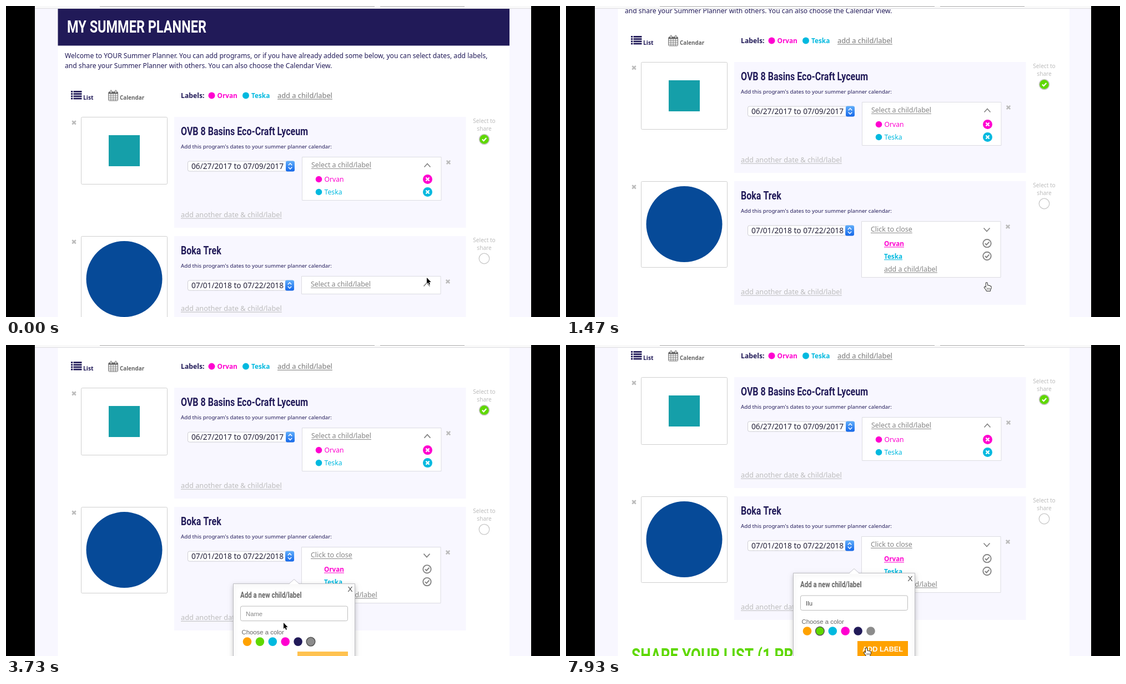
Recreate the animation shown at these times as an HTML page with a canvas. Size 998 by 561 pixels, loop 8000 ms.

```html
<!DOCTYPE html>
<html lang="en">
<head>
<meta charset="utf-8">
<title>Summer planner</title>
<style>
html, body { margin: 0; width: 100%; height: 100%; overflow: hidden; background: #000; }
canvas { display: block; }
</style>
</head>
<body>
<canvas id="stage" width="998" height="561"></canvas>
<script>
const ctx = document.getElementById('stage').getContext('2d');
const LOOP = 8000;
const NAVY = '#211a58', PINK = '#ff00d0', CYAN = '#00b9df', GREEN = '#5fd800', ORANGE = '#ffa200';
const LAVENDER = '#f8f7ff', GRAY = '#858585', PALE = '#bcbcbc';
const SANS = '"Noto Sans", sans-serif', FORM = '"Liberation Sans", Arial, sans-serif';
const CONDENSED = 0.77;
const KIDS = [['Orvan', PINK], ['Teska', CYAN]];
const NEW_KID = 'Ilu';
const OPEN_AT = 530, FOCUS_AT = 5160, TYPE_AT = 5520, PICK_AT = 6980;

const SCROLL = [[0, 0], [803, 0], [870, 13], [930, 28.5], [1130, 72], [1300, 92], [1470, 99],
  [2403, 99], [2670, 102], [3535, 102], [3650, 111], [3800, 133], [3930, 142]];
const CURSOR_X = [[0, 758], [930, 757.5], [1470, 758], [1670, 704], [1900, 655], [2070, 636], [2935, 636],
  [3270, 500], [4005, 500], [4870, 477], [6265, 477], [6800, 456], [7535, 456], [7930, 541]];
const CURSOR_Y = [[0, 490], [70, 490], [130, 498.5], [930, 498.5], [1470, 499.5], [1670, 499], [2070, 474.5], [2935, 474.5],
  [3270, 501], [4005, 501], [4870, 465.5], [6265, 465.5], [6800, 511], [7535, 511], [7930, 547]];

const clamp = v => Math.max(0, Math.min(1, v));
const ramp = (t, start, length) => clamp((t - start) / length);

function track(keys, t) {
  const i = keys.findIndex(k => k[0] > t);
  if (i < 0) return keys[keys.length - 1][1];
  const [t0, a] = keys[i - 1], [t1, b] = keys[i];
  return a + (b - a) * (t - t0) / (t1 - t0);
}

function rect(x, y, w, h, fill, stroke, radius = 0) {
  ctx.beginPath();
  ctx.roundRect(x, y, w, h, radius);
  if (fill) { ctx.fillStyle = fill; ctx.fill(); }
  if (stroke) { ctx.strokeStyle = stroke; ctx.lineWidth = 1; ctx.stroke(); }
}

function disc(x, y, r, fill, stroke, width = 1.5) {
  ctx.beginPath();
  ctx.arc(x, y, r, 0, Math.PI * 2);
  if (fill) { ctx.fillStyle = fill; ctx.fill(); }
  if (stroke) { ctx.strokeStyle = stroke; ctx.lineWidth = width; ctx.stroke(); }
}

function line(points, color, width) {
  ctx.beginPath();
  points.forEach(([x, y]) => ctx.lineTo(x, y));
  ctx.strokeStyle = color;
  ctx.lineWidth = width;
  ctx.stroke();
}

function text(str, x, y, size, color, { weight = 400, family = SANS, align = 'left', underline = false } = {}) {
  ctx.font = `${weight} ${size}px ${family}`;
  ctx.textAlign = align;
  ctx.fillStyle = color;
  ctx.fillText(str, x, y);
  if (underline) ctx.fillRect(x, y + 1.6, ctx.measureText(str).width, 1);
}

function heading(str, x, y, size, color) {
  ctx.save();
  ctx.translate(x, y);
  ctx.scale(CONDENSED, 1);
  text(str, 0, 0, size, color, { weight: 700, family: 'Roboto, sans-serif' });
  ctx.restore();
}

function cross(x, y, r, color, width) {
  line([[x - r, y - r], [x + r, y + r]], color, width);
  line([[x + r, y - r], [x - r, y + r]], color, width);
}

const check = (x, y, color, width = 2) => line([[x - 3.6, y], [x - 1, y + 2.7], [x + 3.8, y - 2.6]], color, width);
const chevron = (x, y, w, h, color, width) => line([[x - w, y + h], [x, y - h], [x + w, y + h]], color, width);

function toolbar() {
  rect(52, 0, 894, 5, '#f9f9f9');
  rect(52, 4, 894, 1, '#dcdce0');
  rect(169, 0, 495, 1, '#aaa');
  rect(674, 0, 152, 1, '#aaa');
}

function pageTop() {
  rect(93.5, 0, 813.5, 71.5, NAVY);
  heading('MY SUMMER PLANNER', 110, 47.5, 30.5, '#fff');
  text('Welcome to YOUR Summer Planner. You can add programs, or if you have already added some below, you can select dates, add labels,', 106, 93.5, 12.11, NAVY);
  text('and share your Summer Planner with others. You can also choose the Calendar View.', 106, 111.5, 12.11, NAVY);

  for (let i = 0; i < 4; i++) {
    rect(117, 153 + i * 4.2, 3.2, 2.8, NAVY);
    rect(121.5, 153 + i * 4.2, 15, 2.8, NAVY);
  }
  text('List', 139, 168.5, 10.3, NAVY, { weight: 700 });

  rect(184.7, 155, 16.8, 15.8, '#fff', '#666', 1.5);
  rect(185, 155, 16.5, 3.5, '#666');
  for (let i = 1; i < 4; i++) {
    line([[184.7 + i * 4.2, 158], [184.7 + i * 4.2, 171]], '#777', 0.9);
    line([[185, 158 + i * 3.3], [201.5, 158 + i * 3.3]], '#777', 0.9);
  }
  for (const x of [188, 196.5]) rect(x, 152, 2.5, 5, '#fff', '#666', 1);
  text('Calendar', 205, 168.5, 9.9, '#666', { weight: 600 });

  text('Labels:', 315, 166, 12.2, NAVY, { weight: 600 });
  KIDS.forEach(([name, color], i) => {
    disc(370.5 + i * 61.5, 161.5, 6, color);
    text(name, 380.5 + i * 61.5, 166, 11.8, color, { weight: 600 });
  });
  text('add a child/label', 489, 166, 12.8, '#777', { weight: 500, underline: true });
}

function dateSelect(y, dates, right) {
  rect(327.5, y + 80, right - 328, 18, '#fff', '#cfcfd4', 3);
  const blue = ctx.createLinearGradient(0, y + 79, 0, y + 98);
  blue.addColorStop(0, '#63b0fb');
  blue.addColorStop(1, '#1769ea');
  rect(right - 16, y + 79.5, 16, 19, blue, null, 3);
  chevron(right - 8, y + 85.5, 3.2, 1.7, '#fff', 1.5);
  chevron(right - 8, y + 92.5, 3.2, -1.7, '#fff', 1.5);
  text(dates, 334, y + 94, 13.7, '#24213a');
}

function card(y, { title, dates, bottom, selectRight, shift }) {
  cross(122.5, y + 10.3, 3.2, PALE, 2.6);
  rect(303, y, 525.5, bottom - y, LAVENDER);
  heading(title, 315, y + 33, 20.8, NAVY);
  text("Add this program's dates to your summer planner calendar:", 315, y + 57.2, 9.7, NAVY);
  dateSelect(y, dates, selectRight);
  cross(797 - shift, y + 82, 3.2, PALE, 2.6);
  text('add another date & child/label', 315, bottom - 19, 12.76, PALE, { underline: true });
  text('Select to', 861.5, y + 11.3, 10.1, PALE, { align: 'center', weight: 500 });
  text('share', 861.5, y + 24.7, 10.1, PALE, { align: 'center', weight: 500 });
}

function dropdown(x, y, h, label, up) {
  rect(x, y, 250.5, h, '#fff', '#dcdce2');
  text(label, x + 16.5, y + 18.7, 12.4, GRAY, { underline: true });
  chevron(x + 225.5, y + 15, 5.5, up ? 3 : -3, GRAY, 1.7);
}

function firstCard() {
  card(200, { title: 'OVB 8 Basins Eco-Craft Lyceum', dates: '06/27/2017 to 07/09/2017', bottom: 400, selectRight: 520, shift: 0 });
  rect(135.5, 200.5, 155, 121, '#fff', '#cfcfcf', 2);
  rect(185, 233, 56, 56, '#159fa9');
  dropdown(533.5, 272.5, 78, 'Select a child/label', true);
  KIDS.forEach(([name, color], i) => {
    const y = 312.5 + i * 23;
    disc(563.5, y, 5.8, color);
    text(name, 573.5, y + 4.6, 12.2, color);
    disc(759.5, y, 8.5, color);
    cross(759.5, y, 3, '#fff', 2.4);
  });
  disc(861.5, 240.5, 9, GREEN, '#c4c4c4');
  check(861.5, 240.5, '#fff', 2.2);
}

function secondCard(open) {
  card(415, { title: 'Boka Trek', dates: '07/01/2018 to 07/22/2018', bottom: open ? 638 : 569, selectRight: 519, shift: 1 });
  rect(135.5, 415.5, 155, 155, '#fff', '#cfcfcf', 2);
  disc(213, 492.5, 68.5, '#064a98');
  disc(861.5, 455.5, 9.3, '#fff', '#c8c8c8', 1.3);
  dropdown(532.5, 487.5, open ? 101 : 32, open ? 'Click to close' : 'Select a child/label', !open);
  if (!open) return;
  KIDS.forEach(([name, color], i) => {
    const y = 527.2 + i * 22.8;
    text(name, 573, y + 4.6, 11.7, color, { weight: 600, underline: true });
    disc(758.5, y, 7.2, '#fff', GRAY, 1.9);
    check(758.5, y, GRAY, 2);
  });
  text('add a child/label', 573, 577.8, 12.4, GRAY, { underline: true });
}

function nameInput(t) {
  const focus = ramp(t, FOCUS_AT, 150) * (1 - ramp(t, PICK_AT, 150));
  rect(422.5, 594, 193, 26.5, '#fff', '#bcbcbc', 3);
  if (focus > 0) {
    ctx.save();
    ctx.globalAlpha *= focus;
    ctx.shadowColor = '#66afe9';
    ctx.shadowBlur = 6;
    rect(422.5, 594, 193, 26.5, '#fff', '#55a5e8', 3);
    ctx.restore();
  }
  const typed = t < TYPE_AT ? 0 : t < 5860 ? 1 : NEW_KID.length;
  const value = typed ? NEW_KID.slice(0, typed) : 'Name';
  text(value, 432, 611.7, 11.3, typed ? '#444' : '#888', { family: FORM });
}

function popup(t) {
  const alpha = ramp(t, 2410, 240);
  if (!alpha) return;
  ctx.save();
  ctx.globalAlpha = alpha;
  ctx.save();
  ctx.shadowColor = 'rgba(0,0,0,.22)';
  ctx.shadowBlur = 8;
  ctx.shadowOffsetY = 3;
  rect(409.5, 553.5, 219, 175, '#fff', '#bdbdc2');
  ctx.restore();
  ctx.beginPath();
  [[510, 554.5], [519, 546], [528, 554.5]].forEach(p => ctx.lineTo(...p));
  ctx.fillStyle = '#fff';
  ctx.fill();
  line([[510, 553.5], [519, 545.5], [528, 553.5]], '#c8c8ce', 1);

  heading('Add a new child/label', 422, 579.3, 14.9, '#666');
  text('X', 620, 568, 13.5, '#444', { family: FORM, align: 'center' });
  nameInput(t);
  text('Choose a color', 424.5, 645, 11.35, '#666', { family: FORM });
  const picked = t < PICK_AT ? 5 : 1;
  [ORANGE, GREEN, CYAN, PINK, NAVY, '#8c8c8c'].forEach((color, i) =>
    disc(434.5 + i * 22.9, 658, 7.8, color, i === picked && '#555', 1.5));

  const ready = ramp(t, TYPE_AT - 20, 200);
  rect(525, 676, 91, 30, `rgb(255,${194 - 32 * ready},${80 - 80 * ready})`);
  text('ADD LABEL', 570.5, 695, 12.6, '#fff', { weight: 700, family: FORM, align: 'center' });
  ctx.restore();
}

function outline(points, fill, stroke, width) {
  ctx.beginPath();
  points.forEach(p => ctx.lineTo(...p));
  ctx.closePath();
  ctx.lineJoin = 'round';
  ctx.strokeStyle = stroke;
  ctx.lineWidth = width;
  ctx.stroke();
  ctx.fillStyle = fill;
  ctx.fill();
  ctx.lineJoin = 'miter';
}

const pointers = {
  arrow() {
    outline([[0, 0], [0, 11], [2.5, 8.7], [4.2, 12.7], [6, 12], [4.3, 8], [7.6, 8]], '#000', '#fff', 1.4);
  },
  hand() {
    outline([[-1, 0], [1, 0], [1.6, 5], [3, 4.6], [4.3, 5.4], [5.6, 5.2], [6.6, 6.2], [7.8, 6.4], [8, 9],
      [6.6, 12], [6.4, 14.3], [0, 14.3], [-1.4, 11.5], [-4, 8.4], [-3.3, 7], [-1, 8.6]], '#fff', '#222', 1.8);
    for (const x of [1, 3.2, 5.4]) line([[x, 9], [x, 12.2]], '#333', 0.8);
  },
  beam() {
    line([[0, -6], [0, 6]], '#222', 1.3);
    for (const s of [-1, 1]) line([[-2.5, 7 * s], [0, 5.8 * s], [2.5, 7 * s]], '#222', 1.1);
    line([[-1.6, 1.5], [1.6, 1.5]], '#222', 1);
  }
};

function pointerAt(t, scroll, x, y) {
  if (t < 100) return 'arrow';
  if (t < 2980) return 'hand';
  if (t > 6650) return 'hand';
  const inInput = x > 422 && x < 616 && y > 594 - scroll && y < 620.5 - scroll;
  return inInput ? 'beam' : 'arrow';
}

function cursor(t, scroll) {
  if (t >= TYPE_AT && t < 6320) return;
  const x = track(CURSOR_X, t), y = track(CURSOR_Y, t);
  ctx.save();
  ctx.translate(x, y);
  pointers[pointerAt(t, scroll, x, y)]();
  ctx.restore();
}

function draw(t) {
  const scroll = track(SCROLL, t);
  rect(0, 0, 998, 561, '#000');
  rect(52, 0, 894, 561, LAVENDER);
  rect(93.5, 0, 813.5, 561, '#fff');
  ctx.save();
  ctx.translate(0, -scroll);
  pageTop();
  firstCard();
  secondCard(t >= OPEN_AT);
  if (t >= OPEN_AT) heading('SHARE YOUR LIST (1 PROGRAM)', 118, 713.5, 34.2, GREEN);
  popup(t);
  ctx.restore();
  toolbar();
  cursor(t, scroll);
}

const start = performance.now();
function tick() {
  draw((performance.now() - start) % LOOP);
  requestAnimationFrame(tick);
}
tick();
</script>
</body>
</html>
```
